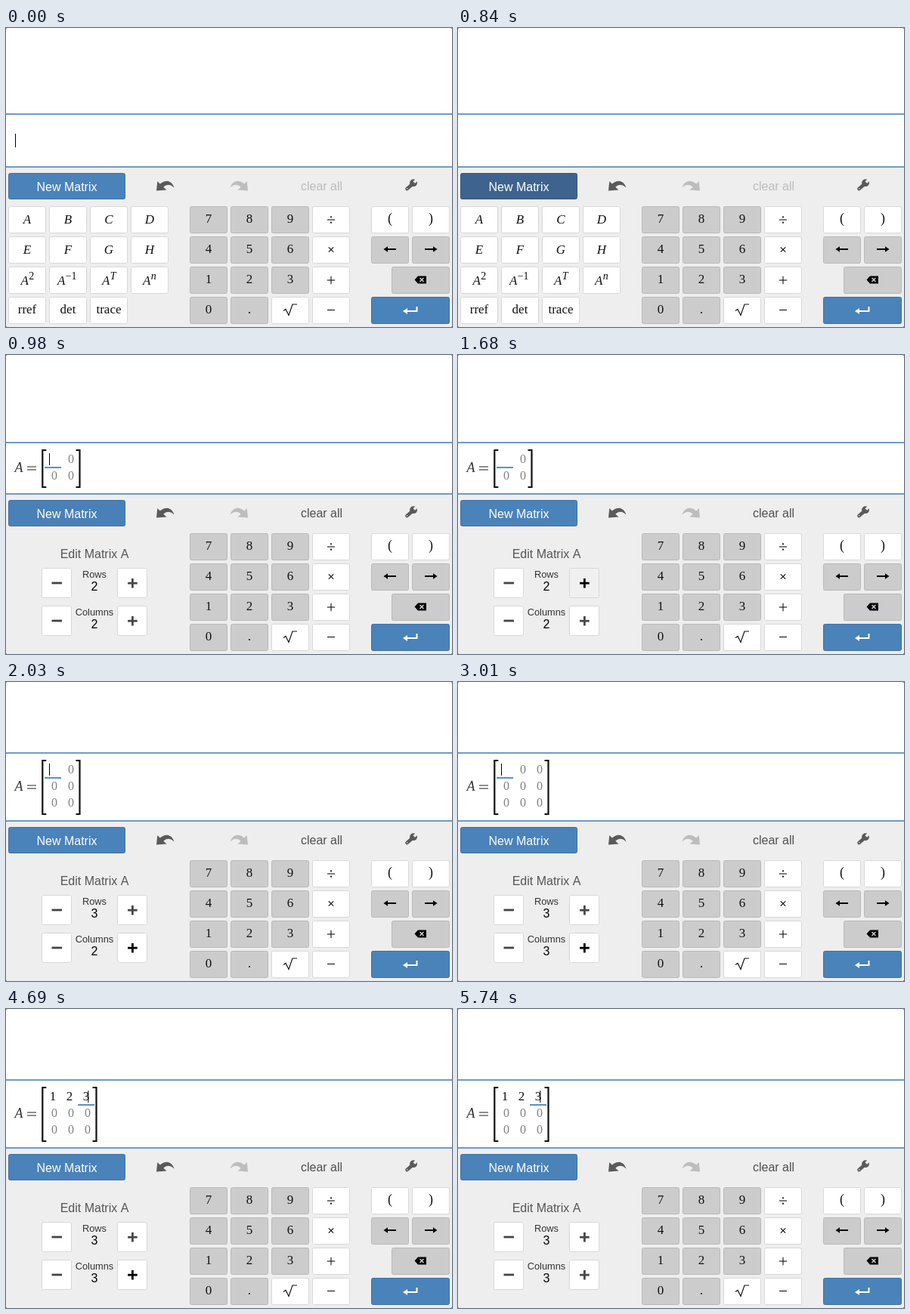
Write an HTML page with a canvas that moves like this. It is 590 px wide and 396 px high and loops after 5.81 s.

```html
<!DOCTYPE html>
<html lang="en">
<head>
<meta charset="utf-8">
<title>Matrix calculator</title>
<style>
  html, body { margin: 0; width: 100%; height: 100%; overflow: hidden; background: #fff; }
  canvas { display: block; }
</style>
</head>
<body>
<canvas id="stage" width="590" height="396"></canvas>
<script>
const ctx = document.getElementById("stage").getContext("2d");
const LOOP = 5810, TICK = 70;
const SANS = '"Liberation Sans", Arial, sans-serif';
const SERIF = '"Liberation Serif", "Times New Roman", serif';
const BLUE = [74, 130, 186], BLUE_DARK = [61, 99, 142], PANEL = "#eeeeee", ICON = "#5a5a5a";
const COLS = [3, 57, 111, 165], NUM_COLS = [243, 297, 351, 405], ROWS = [236, 276, 316, 356];

const ramp = (t, a, b) => Math.max(0, Math.min(1, (t - a) / (b - a)));
const within = (t, a, b) => t >= a && t < b;
const mix = (a, b, k) => `rgb(${a.map((v, i) => Math.round(v + (b[i] - v) * k))})`;

function rect(x, y, w, h, color) {
  ctx.fillStyle = color;
  ctx.fillRect(x, y, w, h);
}

function text(str, x, y, font, color = "#111", align = "center") {
  ctx.font = font;
  ctx.fillStyle = color;
  ctx.textAlign = align;
  ctx.fillText(str, x, y);
}

function line(points, width, color, cap = "butt") {
  ctx.beginPath();
  points.forEach(([x, y]) => ctx.lineTo(x, y));
  ctx.lineWidth = width;
  ctx.strokeStyle = color;
  ctx.lineCap = cap;
  ctx.stroke();
}

function shape(d, color) {
  ctx.fillStyle = color;
  ctx.fill(new Path2D(d));
}

function dot(x, y, r, color) {
  ctx.beginPath();
  ctx.arc(x, y, r, 0, 2 * Math.PI);
  ctx.fillStyle = color;
  ctx.fill();
}

function button(x, y, w, h, fill = "#fff", border = "#d8d8d8") {
  ctx.beginPath();
  ctx.roundRect(x + 0.5, y + 0.5, w - 1, h - 1, 2);
  ctx.fillStyle = fill;
  ctx.fill();
  ctx.lineWidth = 1;
  ctx.strokeStyle = border;
  ctx.stroke();
}

const greyKey = (x, y, w = 50) => button(x, y, w, 36, "#cccccc", "#b9b9b9");

function plus(x, y, r, width, color) {
  line([[x - r, y], [x + r, y]], width, color);
  line([[x, y - r], [x, y + r]], width, color);
}

function curvedArrow(color) {
  shape("M199 215.5 L200.3 203 L203.8 206.6 C210 201 219 201 222.5 211.5 C218 206.5 212 206.5 208.3 210.8 L212.5 214.5 Z", color);
}

function toolbar(t, editing) {
  const dark = ramp(t, 630, 840) - ramp(t, 840, 990);
  button(3, 192, 155, 35, mix(BLUE, BLUE_DARK, dark), mix([65, 113, 163], [54, 88, 127], dark));
  text("New Matrix", 80.5, 216, `16px ${SANS}`, "#fff");

  curvedArrow(ICON);
  ctx.save();
  ctx.translate(519, 0);
  ctx.scale(-1, 1);
  curvedArrow("#bdbdbd");
  ctx.restore();

  text("clear all", 417.5, 215, `16px ${SANS}`, editing ? "#505050" : "#bcbcbc");

  line([[530.5, 213], [538, 206.5]], 4.6, ICON, "round");
  dot(539, 205.2, 4.9, ICON);
  line([[539.8, 204.4], [545, 199.2]], 3.6, PANEL);
  dot(530.8, 212.8, 0.8, PANEL);
}

function power(x, exponent, italic) {
  text("A", x, 340, `italic 17px ${SERIF}`, "#111", "left");
  text(exponent, x + 10.7, 333, `${italic ? "italic " : ""}14px ${SERIF}`, "#111", "left");
}

function letterKeys() {
  ROWS.forEach((y, row) => COLS.forEach((x, col) => {
    if (row === 3 && col === 3) return;
    button(x, y, 50, 36);
    if (row < 2) text("ABCDEFGH"[row * 4 + col], x + 25, y + 22.5, `italic 17px ${SERIF}`);
    if (row === 3) text(["rref", "det", "trace"][col], x + 25, y + 22, `17px ${SERIF}`);
  }));
  power(19.5, "2");
  power(68, "−1");
  power(127, "T", true);
  power(181, "n", true);
}

function numberKeys() {
  const ink = "#111";
  ROWS.forEach((y, row) => NUM_COLS.forEach((x, col) => {
    const white = col === 3 || (row === 3 && col === 2);
    white ? button(x, y, 50, 36) : greyKey(x, y);
    const label = ["789", "456", "123", "0"][row][col];
    if (label) text(label, x + 25, y + 22.3, `17px ${SERIF}`);
  }));
  dot(322, 377, 1.1, ink);
  line([[367, 374.5], [370, 372.5], [374, 380.5], [379, 366], [385, 366]], 1.2, ink);

  line([[425, 254], [435, 254]], 1.1, ink);
  dot(430, 250.3, 1.1, ink);
  dot(430, 257.7, 1.1, ink);
  line([[426.8, 290.3], [433.2, 296.7]], 1.2, ink);
  line([[433.2, 290.3], [426.8, 296.7]], 1.2, ink);
  plus(430, 334, 5.2, 1.1, ink);
  line([[425, 373.5], [435, 373.5]], 1.1, ink);
}

function controlKeys() {
  button(483, 236, 50, 36);
  button(537, 236, 50, 36);
  text("(", 508, 258, `18px ${SERIF}`);
  text(")", 562, 258, `18px ${SERIF}`);

  greyKey(483, 276);
  greyKey(537, 276);
  line([[503, 293], [516, 293]], 2, "#000");
  shape("M499.5 293 L505 289.3 V296.7 Z", "#000");
  line([[554, 293], [567, 293]], 2, "#000");
  shape("M570.5 293 L565 289.3 V296.7 Z", "#000");

  greyKey(510, 316, 77);
  shape("M540.5 333.5 L545 328.5 H556 V338.5 H545 Z", "#000");
  line([[547.5, 331], [552.5, 336]], 1.6, "#ccc");
  line([[552.5, 331], [547.5, 336]], 1.6, "#ccc");

  button(483, 356, 104, 36, mix(BLUE, BLUE, 0), "#4171a3");
  line([[529, 375], [543.5, 375], [543.5, 369]], 2, "#fff");
  shape("M525 375 L531 371 V379 Z", "#fff");
}

function sizeControl(label, value, y, hover, pressed) {
  button(47, y, 40, 40);
  line([[60.5, y + 20], [74, y + 20]], 2.8, "#444");
  button(147, y, 40, 40, pressed ? "#f0f0f0" : "#fff");
  plus(167.4, y + 20.2, 6.3, 2.8, mix([72, 72, 72], [0, 0, 0], hover));
  text(label, 117, y + 13, `12.8px ${SANS}`, "#333");
  text(value, 117, y + 30, `16px ${SANS}`, "#000");
}

function editPanel(t, rows, cols) {
  text("Edit Matrix A", 117, 269, `16px ${SANS}`, "#555");
  sizeControl("Rows", rows, 282, ramp(t, 1190, 1330) - ramp(t, 1890, 2030), within(t, 1540, 1750));
  sizeControl("Columns", cols, 332, ramp(t, 1890, 2030) - ramp(t, 5180, 5250), within(t, 2310, 2380));
}

function bracket(x, top, dir) {
  line([[x + 5 * dir, top + 1], [x, top + 1], [x, 175], [x + 5 * dir, 175]], 2.2, "#111");
}

function matrix(t, rows, cols) {
  const top = rows === 3 ? 103 : 125;
  const firstRow = top + 12.5;
  const middle = (top + 176) / 2 - 0.5;
  text("A", 11.5, middle + 5, `italic 18px ${SERIF}`, "#333", "left");
  line([[28, middle - 2], [40, middle - 2]], 1.1, "#333");
  line([[28, middle + 2], [40, middle + 2]], 1.1, "#333");
  bracket(48.3, top, 1);
  bracket(53.5 + 22 * cols, top, -1);

  const active = t < 3640 ? 0 : t < 4130 ? 1 : 2;
  const typed = [3500, 4060, 4690].filter(at => t >= at).length;
  for (let r = 0; r < rows; r++) {
    for (let c = 0; c < cols; c++) {
      const y = firstRow + 22 * r + 5.5;
      if (r === 0 && c < typed) text(c + 1, 62 + 22 * c, y, `17px ${SERIF}`);
      else if (r > 0 || c !== active) text(0, 64 + 22 * c, y, `16px ${SERIF}`, "#808080");
    }
  }
  rect(51 + 22 * active, top + 23, 22, 2, "#5b8fca");

  const blinkOff = within(t, 1400, 1960) || within(t, 2450, 3010) || within(t, 5250, 5740);
  if (!blinkOff) {
    const offset = typed > active ? 8 - 0.3 * active : 0;
    rect(57 + 22 * active + offset, top + 5, 1, 16, "#000");
  }
}

function draw(time) {
  const t = Math.floor((time % LOOP) / TICK) * TICK;
  const editing = t >= 910;
  const rows = t >= 1750 ? 3 : 2;
  const cols = t >= 2380 ? 3 : 2;

  rect(0, 0, 590, 396, "#fff");
  rect(0, 184, 590, 212, PANEL);
  rect(0, !editing ? 113 : rows === 3 ? 93 : 115, 590, 2, "#6f9bc6");
  rect(0, 183, 590, 2, "#6f9bc6");

  toolbar(t, editing);
  numberKeys();
  controlKeys();
  if (editing) {
    editPanel(t, rows, cols);
    matrix(t, rows, cols);
  } else {
    letterKeys();
    if (t < 560) rect(12, 140, 1, 18, "#000");
  }
  for (const x of [0, 589]) for (const y of [0, 395]) rect(x, y, 1, 1, "#777");
}

let start;
function frame(now) {
  start ??= now;
  draw(now - start);
  requestAnimationFrame(frame);
}
draw(0);
requestAnimationFrame(frame);
</script>
</body>
</html>
```
